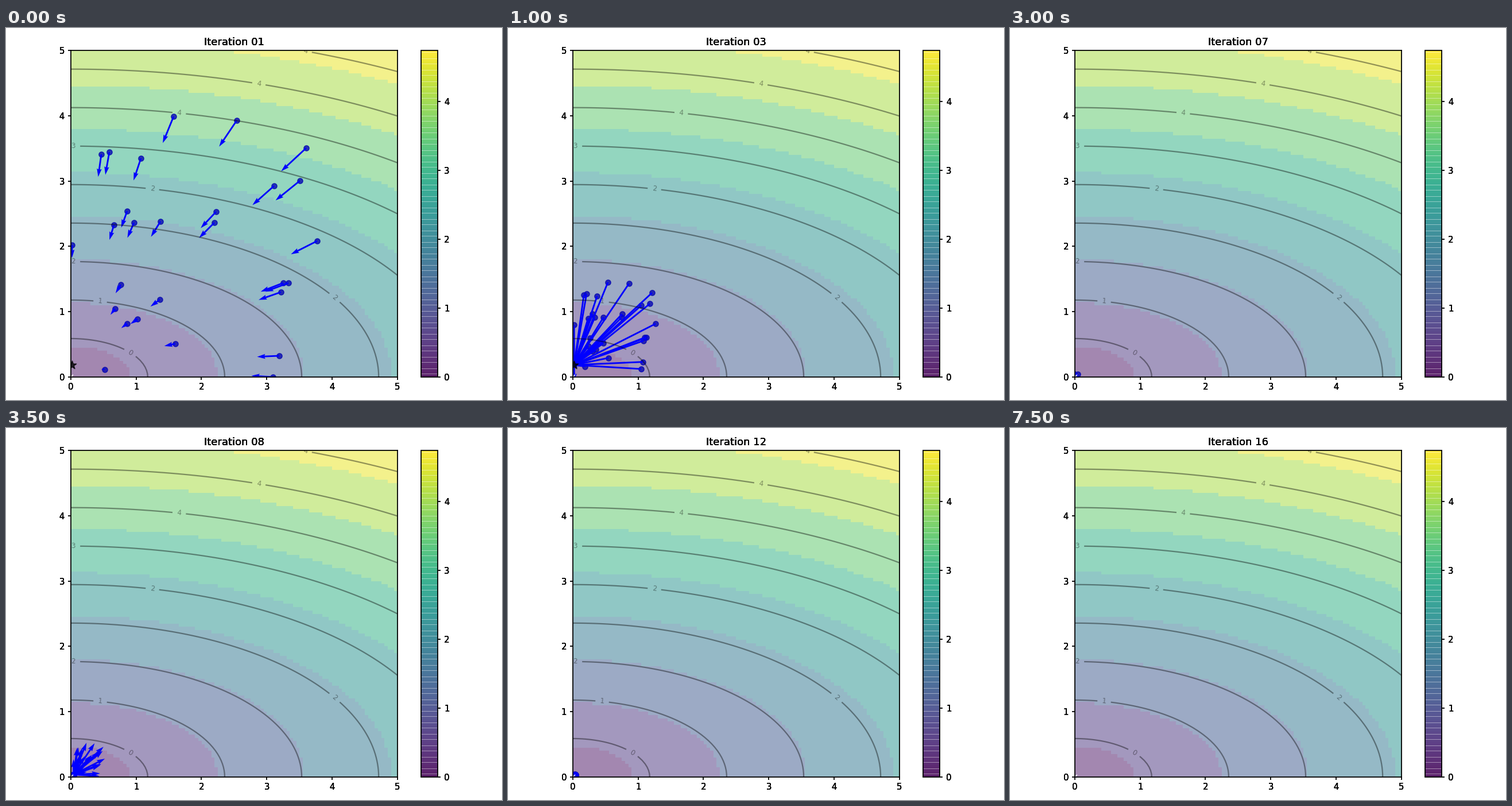
Animation, 864 px wide and 648 px high, one loop 8 s. Source, as a matplotlib script:

```python
import numpy as np
import matplotlib.pyplot as plt
from matplotlib.animation import FuncAnimation
from matplotlib.transforms import IdentityTransform

W, H, DPI = 864, 648, 108
LEFT, BASE, SIZE = 112.8, 608, 568.9
UNIT = SIZE / 5
FRAMES = 16

# Where the particles begin, in stage pixels
STARTS = np.array([
    (292, 154), (402, 161), (523, 209), (166, 220), (180, 216), (235, 227),
    (467, 275), (512, 266), (211, 319), (188, 343), (223, 339), (269, 337),
    (366, 320), (363, 339), (542, 371), (115, 378), (200, 447), (483, 444),
    (492, 444), (479, 460), (268, 473), (190, 489), (211, 515), (229, 507),
    (295, 550), (476, 571), (172, 595), (465, 608),
])
START = np.stack([STARTS[:, 0] - LEFT, BASE - STARTS[:, 1]], -1) / UNIT

DECAY, TURN, LEAD = 0.745, np.radians(42.35), np.radians(27)
FIRST_PULL = 0.107


def best_at(step):
    """Best point found so far; it drifts to the corner."""
    return np.array([np.interp(step, (3, 7, 16), (.022, .05, -.015)),
                     np.interp(step, (3, 7, 16), (.185, .045, -.02))])


def spread(t):
    """Damped swing of the swarm around the best point, 1 at t = 0."""
    if t < 0:
        return 1 + FIRST_PULL
    return DECAY**t * np.cos(TURN * t - LEAD) / np.cos(LEAD)


def swarm(step):
    gap = START - best_at(1)
    now, before = spread(step - 1), spread(step - 2)
    return best_at(step) + now * gap, (now - before) * gap


fig = plt.figure(figsize=(W / DPI, H / DPI), dpi=DPI, facecolor="white")


def add_axes(x, width):
    return fig.add_axes([x / W, (H - BASE) / H, width / W, SIZE / H])


def label(x, y, text, **kw):
    """Text at stage pixels, drawn repeatedly for a heavier look."""
    return [fig.text(x, H - y, text, color="black",
                     transform=IdentityTransform(), **kw) for _ in range(4)]


ax = add_axes(LEFT, SIZE)
cax = add_axes(722.8, 29.5)

# Background: elliptic cone in flat, evenly spaced bands
x, y = np.meshgrid(np.linspace(0, 5, 100), np.linspace(0, 5, 100))
z = np.sqrt(0.18 * x**2 + 0.72 * y**2)
top = z.max()
edges = np.concatenate([[0], 0.378 + 0.571 * np.arange(8), [top]])
mids = (edges[1:] + edges[:-1]) / 2
bands = mids[np.digitize(z, edges[1:-1])]
img = ax.imshow(bands, extent=[0, 5, 0, 5], origin="lower", cmap="viridis",
                alpha=0.5, vmin=0, vmax=top, interpolation="nearest")
bar = fig.colorbar(img, cax=cax, ticks=range(5))
bar.solids.set_edgecolor("face")
bar.outline.set_linewidth(1.2)

ax.plot([0], [0], marker="x", markersize=5, color="white")
levels = np.arange(0.5, 5, 0.5)
lines = ax.contour(x, y, z, levels=levels, colors="black", alpha=0.4)
label_x = np.array([.91, .45, .04, 4.04, 1.25, .04, 1.66, 2.88, 3.59])
label_y = np.sqrt((levels**2 - 0.18 * label_x**2) / 0.72)
ax.clabel(lines, inline=True, fontsize=8, fmt="%.0f", inline_spacing=8,
          manual=list(zip(label_x, label_y)))

ax.set(xlim=(0, 5), ylim=(0, 5), xticks=range(6), yticks=range(6))
ax.tick_params(width=1.2, labelbottom=False, labelleft=False)
cax.tick_params(width=1.2, labelright=False)
for spine in ax.spines.values():
    spine.set_linewidth(1.2)

for n in range(6):
    label(LEFT + n * UNIT, 618.5, str(n), ha="center", va="top", size=10)
    label(102.3, BASE - n * UNIT, str(n), ha="right",
          va="center_baseline", size=10)
for n in range(5):
    label(763, BASE - n * SIZE / top, str(n), ha="left",
          va="center_baseline", size=10)
titles = label(LEFT + SIZE / 2, 30, "", ha="center", va="baseline", size=12)

pos, vel = swarm(1)
shadows = ax.scatter(*pos.T, marker="o", color="black", alpha=0.5)
dots = ax.scatter(*pos.T, marker="o", color="blue", alpha=0.5)
arrows = ax.quiver(*pos.T, *vel.T, color="blue", width=0.005,
                   angles="xy", scale_units="xy", scale=1)
star = ax.scatter([0], [0], marker="*", s=100, color="black", alpha=0.8)


def update(i):
    step = i + 1
    pos, vel = swarm(step)
    best = best_at(step)
    leading = step > 3  # a particle has taken over the best point
    points = np.vstack([pos, best]) if leading else pos
    shadows.set_offsets(points)
    dots.set_offsets(points)
    arrows.set_offsets(pos)
    arrows.set_UVC(*vel.T)
    star.set_offsets([best])
    star.set_visible(not leading)
    for t in titles:
        t.set_text(f"Iteration {step:02d}")
    return [shadows, dots, arrows, star, *titles]


anim = FuncAnimation(fig, update, frames=FRAMES, interval=500, repeat=True)
plt.show()
```
